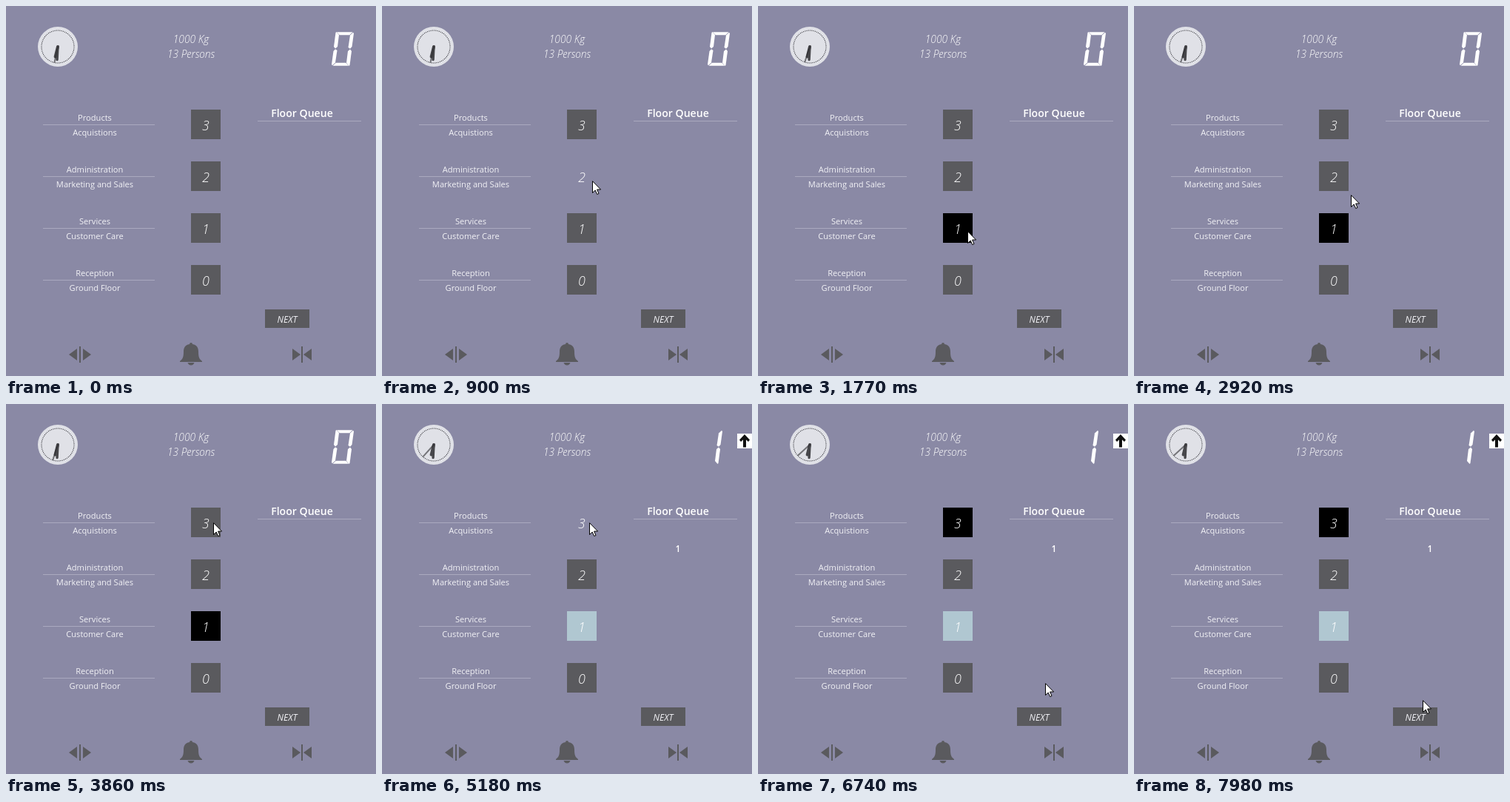
Animation, 500 px wide and 500 px high, one loop 8 s. Source, as an HTML page:

```html
<!DOCTYPE html>
<html lang="en">
<head>
<meta charset="utf-8">
<title>Elevator panel</title>
<style>
html, body { margin: 0; width: 100%; height: 100%; overflow: hidden; background: #8a89a5; }
svg { display: block; width: 100vw; height: 100vh; }
text { font-family: "Open Sans", "Noto Sans", sans-serif; fill: #fff; text-anchor: middle; }
.label { font-size: 11.1px; fill: #f2f2f6; }
.load { font-size: 13.8px; font-weight: 300; font-style: italic; }
.num { font-size: 18px; font-weight: 300; font-style: italic; }
.next { font-size: 12px; font-style: italic; fill: #f2f2f6; }
.title { font-size: 14.1px; font-weight: 600; }
.queue { font-size: 12px; font-weight: 600; }
.rule { fill: #aaa9bf; }
.dark { fill: #5a5a5e; }

.anim { animation: 8s step-end infinite; }
#cursor { animation-name: move; }
#ring { animation-name: press; }
#second { animation-name: tick; }
#btn1 { animation-name: btn1; }
#btn2 { animation-name: btn2; }
#btn3 { animation-name: btn3; }
.before { animation-name: before; }
.after { animation-name: after; }

@keyframes move {
  0% { transform: translate(-40px, -40px); }
  2.625% { transform: translate(360px, 368px); }
  3.5625% { transform: translate(342px, 350px); }
  4.5% { transform: translate(330px, 338px); }
  8.375% { transform: translate(326px, 325px); }
  9.375% { transform: translate(308px, 282px); }
  10.25% { transform: translate(292px, 250px); }
  11.25% { transform: translate(284px, 236px); }
  12.25% { transform: translate(285px, 270px); }
  13.125% { transform: translate(285px, 305px); }
  16.25% { transform: translate(283px, 304px); }
  34.75% { transform: translate(286px, 290px); }
  35.625% { transform: translate(293px, 255px); }
  36.625% { transform: translate(297px, 218px); }
  37.5% { transform: translate(297px, 193px); }
  38.375% { transform: translate(295px, 182px); }
  40.5% { transform: translate(291px, 174px); }
  41.4375% { transform: translate(284px, 163px); }
  42.375% { transform: translate(280px, 158px); }
  47.375% { transform: translate(280px, 159px); }
  48.25% { transform: translate(280px, 160px); }
  80.375% { transform: translate(291px, 182px); }
  81.375% { transform: translate(320px, 245px); }
  82.375% { transform: translate(356px, 318px); }
  83.25% { transform: translate(380px, 364px); }
  84.25% { transform: translate(388px, 377px); }
  99.75%, 100% { transform: translate(390px, 400px); }
}
@keyframes press {
  0%, 22.125%, 74.625%, 100% { opacity: 0; }
  19.125%, 71.625% { opacity: 1; }
}
@keyframes tick {
  0% { transform: rotate(192deg); }
  12.25% { transform: rotate(198deg); }
  64.75% { transform: rotate(222deg); }
  74.625%, 100% { transform: rotate(228deg); }
}
@keyframes btn1 {
  0% { fill: #5a5a5e; }
  13.125% { fill: transparent; }
  20% { fill: #000; }
  64.75%, 100% { fill: #b0c7d1; }
}
@keyframes btn2 {
  0%, 12.25%, 100% { fill: #5a5a5e; }
  11.25% { fill: transparent; }
}
@keyframes btn3 {
  0% { fill: #5a5a5e; }
  64.75% { fill: transparent; }
  72.5%, 100% { fill: #000; }
}
@keyframes before {
  0% { opacity: 1; }
  64.75%, 100% { opacity: 0; }
}
@keyframes after {
  0% { opacity: 0; }
  64.75%, 100% { opacity: 1; }
}
</style>
</head>
<body>
<svg viewBox="0 0 500 500">
  <defs>
    <g id="bars">
      <path d="M469 35.7L470 37L467.5 55L465 57.7L462.5 56L465 39.5Z"/>
      <path d="M465 58.5L467 61L464.5 80L463.5 81L460 77L462 61Z"/>
    </g>
    <path id="cap" d="M447 35.3H468.5L464.3 39.3H450.8Z"/>
  </defs>

  <!-- clock -->
  <g transform="translate(70 55)">
    <circle r="27" fill="#e0e1e7"/>
    <circle r="22" fill="none" stroke="#3c3c42" stroke-width="1.1" pathLength="120" stroke-dasharray="1 1"/>
    <g stroke="#47474b" stroke-linecap="round">
      <path d="M0 0V-14" stroke-width="4" transform="rotate(194)"/>
      <path d="M0 0V-17.5" stroke-width="3.4" transform="rotate(183)"/>
      <path id="second" class="anim" d="M0 0V-21.5" stroke="#2b2b2e" stroke-width="1.2"/>
    </g>
  </g>

  <text class="load" x="250" y="50">1000 Kg</text>
  <text class="load" x="250" y="70">13 Persons</text>

  <!-- floor display -->
  <g fill="#fff">
    <g class="anim before">
      <use href="#bars"/>
      <use href="#cap"/>
      <g transform="rotate(180 455 58)">
        <use href="#bars"/>
        <use href="#cap"/>
      </g>
    </g>
    <g class="anim after">
      <use href="#bars" x="-10"/>
      <path d="M480 40H500V60H480Z"/>
      <path fill="#111" d="M490 41L497 48.5L495 51L492 48.2V58.5H488V48.2L485 51L483 48.5Z"/>
    </g>
  </g>

  <!-- floors -->
  <g id="floors"></g>

  <!-- queue -->
  <text class="title" x="400" y="150">Floor Queue</text>
  <rect class="rule" x="340" y="155" width="140" height="1"/>
  <text class="queue anim after" x="400" y="200">1</text>
  <rect class="dark" x="350" y="410" width="60" height="25"/>
  <text class="next" x="380" y="428">NEXT</text>

  <!-- door and alarm icons -->
  <g class="dark">
    <path d="M85 471L96 463V479ZM99 460H101V482H99ZM115 471L104 463V479Z"/>
    <path d="M387 463L398 471L387 479ZM399 460H401V482H399ZM413 463L402 471L413 479Z"/>
    <path d="M248 457Q248 455 250 455T252 457C258 458 260 462 260 467C260 474 261 477 265 480V481H235V480C239 477 240 474 240 467C240 462 242 458 248 457Z"/>
    <path d="M245.5 482H254.5Q253 485.5 250 485.5T245.5 482Z"/>
  </g>

  <g id="cursor" class="anim">
    <g id="ring" class="anim" fill="none">
      <circle r="10.5" stroke="#000"/>
      <circle r="11.5" stroke="#fff"/>
    </g>
    <path d="M.5 .7V16.5L4.2 13L6.7 18.5L9 17.5L6.6 12H11.6Z" fill="#fff" stroke="#000"/>
  </g>
</svg>
<script>
const floors = [
  ["Reception", "Ground Floor"],
  ["Services", "Customer Care"],
  ["Administration", "Marketing and Sales"],
  ["Products", "Acquistions"]
];
document.getElementById("floors").innerHTML = floors.map(([upper, lower], n) => {
  const y = 370 - 70 * n;
  return `<text class="label" x="120" y="${y - 5}">${upper}</text>
    <rect class="rule" x="50" y="${y}" width="151" height="1"/>
    <text class="label" x="120" y="${y + 15}">${lower}</text>
    <rect id="btn${n}" class="dark anim" x="250" y="${y - 20}" width="40" height="40"/>
    <text class="num" x="270" y="${y + 7.8}">${n}</text>`;
}).join("");
</script>
</body>
</html>
```
